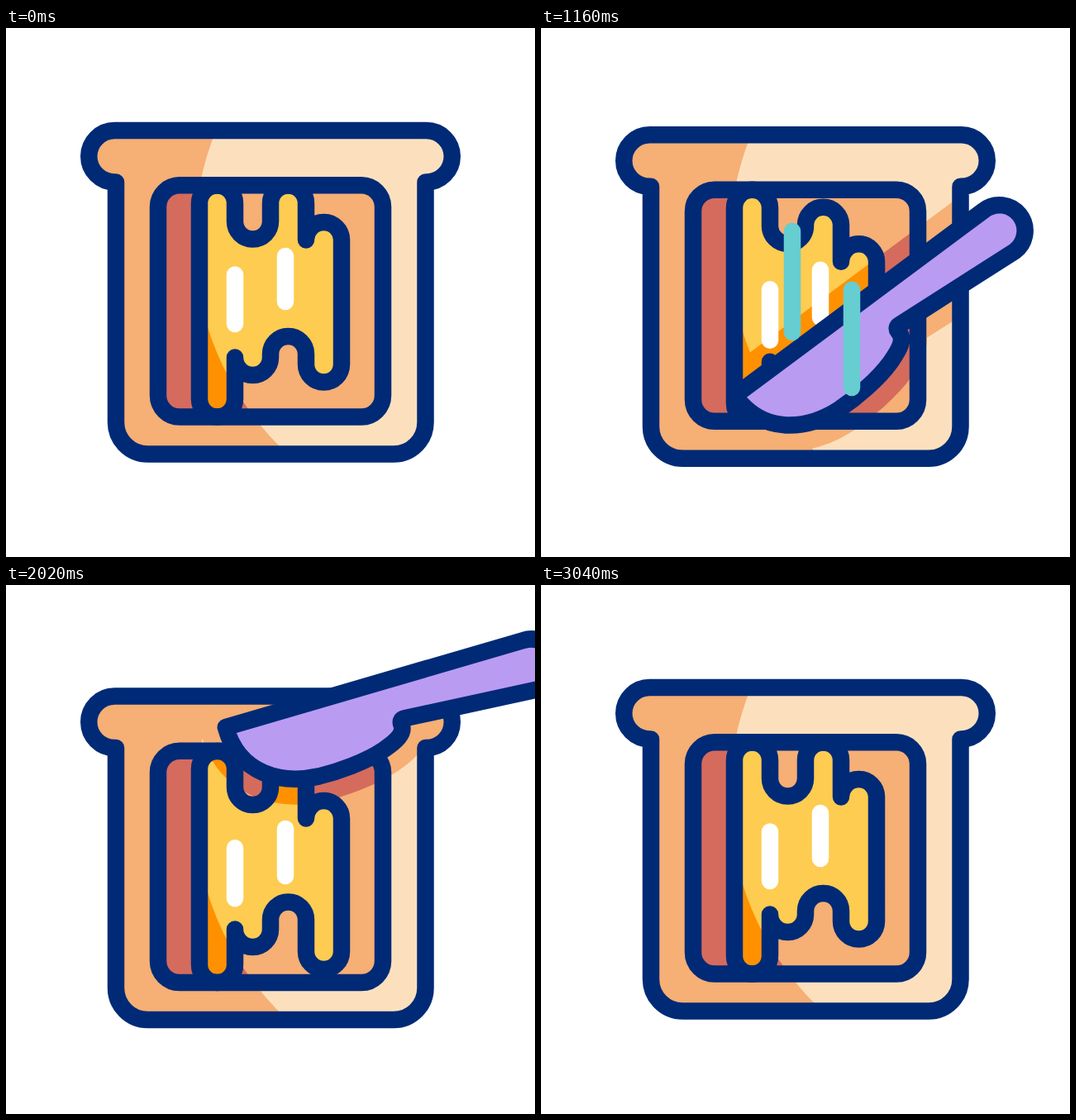
These frames come from a looping animation (640x640 px, 3600 ms). An HTML page:

```html
<!DOCTYPE html>
<html lang="en">
<head>
<meta charset="utf-8">
<title>Buttered toast</title>
<style>
  html, body { margin: 0; width: 100%; height: 100%; overflow: hidden; background: #fff; }
  svg { display: block; width: 100vw; height: 100vh; }
  .line { fill: none; stroke: #002a76; stroke-width: 20.5; stroke-linejoin: round; stroke-linecap: round; }
  .bar { stroke-width: 20.5; stroke-linecap: round; }
  .lit { --crust: #fce0be; --crumb: #f6af74; --butter: #fdcc50; }
  .dim { --crust: #f6af74; --crumb: #d56b5d; --butter: #ff9100; }
</style>
</head>
<body>
<svg viewBox="0 0 640 640">
  <defs>
    <path id="crust" d="M133 186.5H131.5A31.25 31.25 0 0 1 131.5 124H508.5A31.25 31.25 0 0 1 508.5 186.5H507.5V477A38.5 38.5 0 0 1 469 515.5H171.5A38.5 38.5 0 0 1 133 477Z"/>
    <rect id="crumb" x="184" y="190.3" width="272" height="280.2" rx="26"/>
    <path id="butter"/>
    <path id="knife" d="M-11 -9.5L364 -10A31 31 0 0 1 366 52L200 40.5Q194 40 194 46C196 59 180 65 165 70C140 78 105 80 81 79C35 76 -12 50 -11 -9.5Z"/>
    <g id="fills">
      <use href="#crust" style="fill:var(--crust)"/>
      <use href="#crumb" style="fill:var(--crumb)"/>
      <use href="#butter" style="fill:var(--butter)"/>
    </g>
    <mask id="light" maskUnits="userSpaceOnUse" x="0" y="0" width="640" height="640">
      <circle cx="581" cy="257" r="353" fill="#fff"/>
      <use id="shadow" href="#knife" fill="#000" stroke="#000" stroke-width="62" stroke-linejoin="round"/>
    </mask>
  </defs>

  <g id="toast">
    <use href="#fills" class="dim"/>
    <g mask="url(#light)"><use href="#fills" class="lit"/></g>
    <use href="#crust" class="line"/>
    <use href="#butter" class="line"/>
    <use href="#crumb" class="line"/>
    <line id="shineA" class="bar" stroke="#fff" x1="277" x2="277"/>
    <line id="shineB" class="bar" stroke="#fff" x1="338" x2="338"/>
  </g>
  <g id="blade">
    <use href="#knife" fill="#ba9bf2"/>
    <use href="#knife" class="line"/>
  </g>
  <line id="dashA" class="bar" stroke="#66cdd0" x1="304" x2="304"/>
  <line id="dashB" class="bar" stroke="#66cdd0" x1="376" x2="376"/>
</svg>

<script>
const LOOP = 3600;
const el = id => document.getElementById(id);
const set = (id, attrs) => { for (const k in attrs) el(id).setAttribute(k, attrs[k]); };

const ease = {
  linear: u => u,
  in: u => u * u,
  out: u => 1 - (1 - u) ** 2,
  inOut: u => (1 - Math.cos(Math.PI * u)) / 2
};
const span = (t, a, b, f = ease.inOut) => f(Math.min(1, Math.max(0, (t - a) / (b - a))));

// time, tip x, tip y, angle, easing towards the next pose
const poses = [
  [0, 668, 10, 20, 'out'],
  [760, 243, 277, -25.3, 'inOut'],
  [1160, 249, 446, -36.6, 'linear'],
  [1460, 242, 423, -31.7, 'inOut'],
  [1780, 240, 218, -24.2, 'in'],
  [2220, 370, 85, 2.5, 'linear'],
  [2540, 700, -70, 22, 'linear'],
  [LOOP, 700, -70, 22, 'linear']
];

function knifePose(t) {
  const i = poses.findIndex((p, n) => n && t <= p[0]);
  const a = poses[i - 1], b = poses[i];
  const u = span(t, a[0], b[0], ease[a[4]]);
  const [x, y, r] = [1, 2, 3].map(k => a[k] + (b[k] - a[k]) * u);
  return `translate(${x} ${y}) rotate(${r})`;
}

// top: how far the upper edge is scraped down; drip: how far the lower edge runs
function butterPath(top, drip) {
  const arc = (x, y, sweep) => `A21.5 21.5 0 0 ${sweep} ${x} ${y}`;
  const peak = 212 + 21 * top, notch = 256.5 + 21 * top;
  const dot = 398.5 + 10 * drip, tail = 407 + 35 * drip;
  return `M234 212${arc(277, 212, 1)}V234${arc(320, 234, 0)}V${peak}${arc(363, peak, 1)}` +
    `V${notch}${arc(406, notch, 1)}V${tail}${arc(363, tail, 1)}V394.5${arc(320, 394.5, 0)}` +
    `V${dot}${arc(277, dot, 1)}V449${arc(234, 449, 1)}Z`;
}

function dash(id, t, from, to) {
  const head = from + (to - from) * span(t, 860, 1150) + 3 * span(t, 1160, 1460);
  const tail = from + (to + 3 - from) * span(t, 1130, 1730);
  set(id, { y1: tail, y2: head, visibility: t > 880 && t < 1700 ? 'visible' : 'hidden' });
}

function draw(t) {
  const rest = 1 - span(t, 1700, 2640);
  const sink = 14.3 * span(t, 800, 1660) * rest;
  const top = span(t, 800, 1140) * rest;
  const drip = span(t, 1180, 1720) * rest;

  const u = span(t, 2636, 3040, ease.linear);
  const hop = Math.sin(Math.PI * u);
  set('toast', {
    transform: `translate(320 ${320 + sink - 12 * hop}) scale(${1 - 0.06 * hop} 1) ` +
      `rotate(${360 * ease.inOut(u)}) translate(-320 -320)`
  });

  const pose = knifePose(t);
  set('blade', { transform: pose });
  set('shadow', { transform: `translate(0 ${-sink}) ${pose}` });

  set('butter', { d: butterPath(top, drip) });
  set('shineA', { y1: 298.5 + 12.5 * top, y2: 358 + 14.5 * top });
  set('shineB', { y1: 276 + 11.5 * top, y2: 331 + 14 * top });
  dash('dashA', t, 245, 368);
  dash('dashB', t, 316, 435);
}

const start = performance.now();
function tick() {
  draw((performance.now() - start) % LOOP);
  requestAnimationFrame(tick);
}
tick();
</script>
</body>
</html>
```
